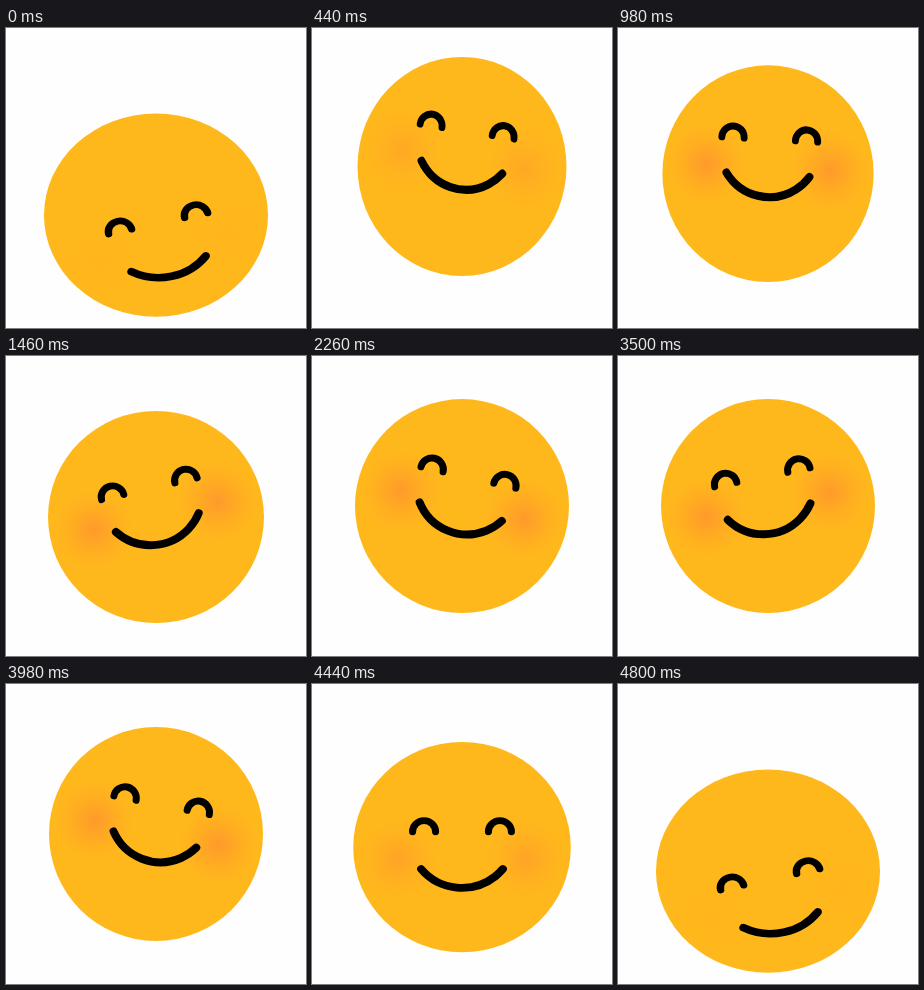
Recreate the animation shown at these times as an HTML page with a canvas. Size 300 px wide and 300 px high, loop 4820 ms.

```html
<!DOCTYPE html>
<html lang="en">
<head>
<meta charset="utf-8">
<title>Bouncing smile</title>
<style>
  html, body { margin: 0; width: 100%; height: 100%; overflow: hidden; background: #fefefe; }
  canvas { display: block; width: 100vw; height: 100vh; }
</style>
</head>
<body>
<canvas id="stage"></canvas>
<script>
const SIZE = 300, LOOP = 4820, RADIUS = 107;
const canvas = document.getElementById('stage');
const ctx = canvas.getContext('2d');
const ratio = window.devicePixelRatio || 1;
canvas.width = canvas.height = SIZE * ratio;

const bezier = (a, b, u) => 3 * (1 - u) ** 2 * u * a + 3 * (1 - u) * u * u * b + u ** 3;

// Easing curve with horizontal handles at x1 and x2.
function easing(x1, x2) {
  return x => {
    let low = 0, high = 1;
    for (let i = 0; i < 24; i++) {
      const mid = (low + high) / 2;
      if (bezier(x1, x2, mid) < x) low = mid; else high = mid;
    }
    return bezier(0, 1, (low + high) / 2);
  };
}

const smooth = easing(1 / 3, 2 / 3);
const snappy = easing(1 / 3, 0.23);

// Each key is [time, value, easing towards it].
function track(...keys) {
  return t => {
    const next = keys.findIndex(key => key[0] > t);
    if (next < 0) return keys[keys.length - 1][1];
    const [t0, v0] = keys[next - 1];
    const [t1, v1, ease = smooth] = keys[next];
    return v0 + (v1 - v0) * ease((t - t0) / (t1 - t0));
  };
}

const bodyY = track([0, 187.2], [600, 136, snappy], [1500, 161.2], [2300, 150], [4200, 150], [4800, 187.2]);
const radiusX = track([0, 112], [600, 104.1, snappy], [1500, 108], [2300, RADIUS], [4200, RADIUS], [4800, 112]);
const radiusY = track([0, 101.6], [600, 109.9, snappy], [1500, 106], [2300, RADIUS], [4200, RADIUS], [4800, 101.6]);
const tilt = track([0, -13.2], [600, 13.2], [1500, -13.2], [2250, 12.7], [3380, -13.2], [4090, 12.7], [4800, -13.2]);
const faceY = track([0, 38.3], [600, -7.6, snappy], [1500, 0], [4200, 0], [4800, 38.3]);
const smile = track([0, 0], [600, 1, snappy], [4200, 1], [4800, 0]);
const blush = track([0, 0.07], [900, 1], [4200, 1], [4800, 0.07]);

function cheek(x, y, alpha) {
  const r = 42;
  const glow = ctx.createRadialGradient(x, y, 0, x, y, r);
  glow.addColorStop(0, `rgba(255,150,46,${0.9 * alpha})`);
  glow.addColorStop(0.5, `rgba(255,155,42,${0.4 * alpha})`);
  glow.addColorStop(1, 'rgba(255,170,34,0)');
  ctx.fillStyle = glow;
  ctx.fillRect(x - r, y - r, 2 * r, 2 * r);
}

function eye(x) {
  ctx.beginPath();
  ctx.arc(x, -29.3, 11.3, Math.PI, 2 * Math.PI);
  ctx.stroke();
}

function mouth(amount) {
  const half = 36.5 + 5.6 * amount;
  const top = 14.3 - 8.6 * amount;
  const bottom = 27.8;
  const sag = bottom - top;
  const r = (half * half + sag * sag) / (2 * sag);
  const spread = Math.asin(half / r);
  ctx.beginPath();
  ctx.arc(0, bottom - r, r, Math.PI / 2 + spread, Math.PI / 2 - spread, true);
  ctx.stroke();
}

function draw(t) {
  ctx.setTransform(ratio, 0, 0, ratio, 0, 0);
  ctx.fillStyle = '#fefefe';
  ctx.fillRect(0, 0, SIZE, SIZE);

  ctx.save();
  ctx.translate(SIZE / 2, bodyY(t));
  ctx.scale(radiusX(t) / RADIUS, radiusY(t) / RADIUS);
  ctx.beginPath();
  ctx.arc(0, 0, RADIUS, 0, 2 * Math.PI);
  ctx.fillStyle = '#ffb81c';
  ctx.fill();
  ctx.clip();

  ctx.rotate(tilt(t) * Math.PI / 180);
  ctx.translate(0, faceY(t));
  cheek(-63, -1.5, blush(t));
  cheek(63, -1.5, blush(t));

  ctx.strokeStyle = '#000';
  ctx.lineCap = 'round';
  ctx.lineWidth = 7;
  eye(-37.3);
  eye(37.3);
  ctx.lineWidth = 8;
  mouth(smile(t));
  ctx.restore();
}

const start = performance.now();
function tick() {
  draw((performance.now() - start) % LOOP);
  requestAnimationFrame(tick);
}
tick();
</script>
</body>
</html>
```
